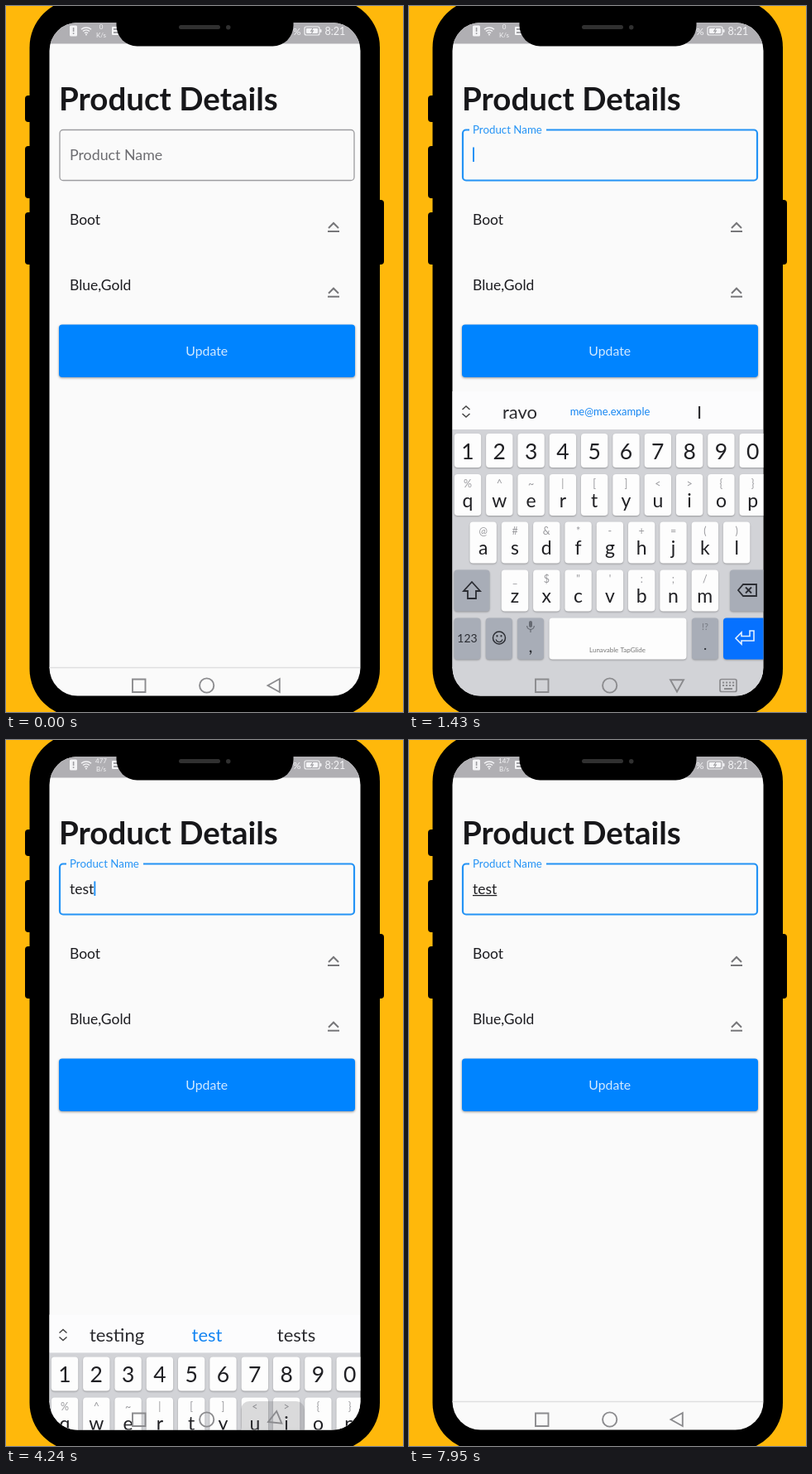
Animation, 480 px wide and 852 px high, one loop 8 s. Source, as an HTML page with a canvas:

```html
<!DOCTYPE html>
<html lang="en">
<head>
<meta charset="utf-8">
<title>Product form</title>
<style>
html, body { margin: 0; width: 100%; height: 100%; overflow: hidden; background: #ffb80b; }
canvas { display: block; }
</style>
</head>
<body>
<canvas id="stage" width="480" height="852"></canvas>
<script>
const ctx = document.getElementById('stage').getContext('2d');
const LOOP = 8000;
const INK = '#1c1c20', BLUE = '#2493f5', KEY_STEP = 38.3, KEYBOARD_HEIGHT = 368;

// Each entry holds from its time until the next one.
const typing = [[0, ''], [2100, 't'], [2480, 'te'], [2850, 'tes'], [3200, 'test']];
const hints = {
  '': ['ravo', 'me@me.example', 'I'],
  t: ['the', 't', 'to'],
  te: ['tell', 'te', 'tell me'],
  tes: ['test', 'tes', 'tests'],
  test: ['testing', 'test', 'tests']
};
const netSpeed = [[0, '0', 'K/s'], [2510, '477', 'B/s'], [5200, '35', 'B/s'], [7900, '147', 'B/s']];
const cursorResets = [600, 1300, 2100, 2480, 2850, 3200, 3780];

const lerp = (a, b, k) => a + (b - a) * k;
const latest = (list, t) => list.filter(item => item[0] <= t).pop();
function ramp(t, start, duration) {
  const u = Math.min(1, Math.max(0, (t - start) / duration));
  return u * u * (3 - 2 * u);
}

function text(str, x, y, size, color, align = 'left', weight = 400) {
  ctx.font = `${weight} ${size}px Lato, sans-serif`;
  ctx.textAlign = align;
  ctx.fillStyle = color;
  ctx.fillText(str, x, y);
}
const label = (str, x, y, size, color) => text(str, x, y, size, color, 'center');

function box(x, y, w, h, r, color) {
  ctx.beginPath();
  ctx.roundRect(x, y, w, h, r);
  ctx.fillStyle = color;
  ctx.fill();
}
function line(points, color, width = 2, closed = false) {
  ctx.beginPath();
  points.forEach(([x, y]) => ctx.lineTo(x, y));
  if (closed) ctx.closePath();
  stroke(color, width);
}
function stroke(color, width) {
  ctx.strokeStyle = color;
  ctx.lineWidth = width;
  ctx.stroke();
}
function arc(x, y, r, color, width, from = 0, to = Math.PI * 2) {
  ctx.beginPath();
  ctx.arc(x, y, r, from, to);
  stroke(color, width);
}
function shadowed(blur, color, draw) {
  ctx.save();
  ctx.shadowBlur = blur;
  ctx.shadowOffsetY = 1;
  ctx.shadowColor = color;
  draw();
  ctx.restore();
}

function statusBar(t) {
  const white = '#f4f4f6';
  box(52, 20, 376, 25.5, 0, '#b0afb3');
  box(77, 23.5, 9, 13, 1.5, white);
  box(80.8, 26, 1.6, 5, 0, '#a0a0a4');
  box(80.8, 32.3, 1.6, 1.7, 0, '#a0a0a4');
  for (const r of [3, 6, 9]) arc(97, 35, r, white, 1.4, -2.3, -0.84);
  box(96, 33.5, 2, 2, 1, white);
  const [, amount, unit] = latest(netSpeed, t);
  label(amount, 115, 28, 8, white);
  label(unit, 115, 37.5, 8, white);
  box(128, 25, 8, 10, 1, white);
  box(130, 27, 6, 2, 0, '#a0a0a4');
  box(130, 31, 6, 2, 0, '#a0a0a4');
  text('%', 347, 34.5, 12, white);
  ctx.beginPath();
  ctx.roundRect(361, 25, 18, 10, 2);
  stroke(white, 1.2);
  box(363, 27, 14, 6, 1, white);
  box(379.5, 28, 2, 4, 1, white);
  line([[371, 27], [368.5, 30.5], [371.5, 29.7], [369.5, 33]], '#8f8f93', 1);
  text('8:21', 385.5, 34.5, 12.5, white);
}

function nameField(t) {
  const focus = ramp(t, 400, 200);
  const color = focus > 0.4 ? BLUE : '#9c9c9f';
  ctx.beginPath();
  ctx.roundRect(65, 149.5, 356, 61, 4);
  stroke(color, lerp(1.3, 2.2, focus));
  if (focus > 0) box(lerp(119, 73, focus), 146, 93 * focus, 7, 0, '#fafafa');
  text('Product Name', 77, lerp(186, 154, focus), lerp(17.8, 13.3, focus), focus > 0.4 ? BLUE : '#6c6c70');
  if (focus < 1) return;

  const value = latest(typing, t)[1];
  text(value, 77, 185.5, 17.5, INK);
  const width = ctx.measureText(value).width;
  const composing = t < 4080 || t > 5200;
  if (composing) box(77, 187, width, 1.2, 0, INK);
  const sinceReset = t - cursorResets.filter(time => time <= t).pop();
  if (sinceReset % 1060 < 530) box(77 + width, 170.5, 2, 17.5, 0, BLUE);
}

function dropdown(value, y) {
  text(value, 77, y, 17.5, INK);
  line([[390, y + 4], [396, y - 2], [402, y + 4]], '#77777a');
  line([[389, y + 8], [403, y + 8]], '#77777a');
}

function page(t) {
  text('Product Details', 64, 126, 38.5, '#17171a', 'left', 700);
  nameField(t);
  dropdown('Boot', 264);
  dropdown('Blue,Gold', 342.7);
  shadowed(3, 'rgba(0,0,0,.4)', () => box(64, 384.5, 358, 63.5, 4, '#0084ff'));
  label('Update', 242.7, 422, 15.8, '#d2eaff');
  line([[52, 798.5], [428, 798.5]], '#dededf', 1.5);
}

function key(x, y, w, h, color = '#fdfdfd') {
  shadowed(2, 'rgba(0,0,0,.28)', () => box(x, y, w, h, 4, color));
}
function keyRow(chars, alternates, x, y, h) {
  [...chars].forEach((char, i) => {
    const center = x + i * KEY_STEP;
    key(center - 16.2, y, 32.4, h);
    if (alternates) {
      label(alternates[i], center, y + 15.5, 12.5, '#99999d');
      label(char, center, y + 39.5, 23, '#202024');
    } else {
      label(char, center, y + 31, 26.5, '#202024');
    }
  });
}

function keyboard(t, offset) {
  const gray = '#a8adb7', dark = '#2b2d33';
  ctx.save();
  ctx.translate(0, offset);
  box(52, 465, 376, 46, 0, '#fcfcfd');
  box(52, 511, 376, 330, 0, '#d2d3d7');
  line([[64.5, 487], [69, 483], [73.5, 487]], '#444', 1.5);
  line([[64.5, 492], [69, 496], [73.5, 492]], '#444', 1.5);
  const value = latest(typing, t)[1];
  const [left, middle, right] = hints[value];
  label(left, 134, 497.5, 22, '#2a2a2e');
  label(middle, 243, value ? 497.5 : 494, value ? 22 : 13, '#1485f2');
  label(right, 351, 497.5, 22, '#2a2a2e');

  keyRow('1234567890', null, 71, 516, 41);
  keyRow('qwertyuiop', '%^~|[]<>{}', 71, 565, 50);
  keyRow('asdfghjkl', '@#&*-+=()', 89.7, 622.5, 50);
  keyRow('zxcvbnm', '_$"\':;/', 128, 680.5, 50);

  key(54.5, 680.5, 43, 50, gray);
  line([[76, 695], [86, 706], [81, 706], [81, 715], [71, 715], [71, 706], [66, 706]], dark, 1.8, true);
  key(388, 680.5, 44, 50, gray);
  line([[398, 705], [404, 698], [420, 698], [420, 712], [404, 712]], dark, 1.8, true);
  line([[407, 701.5], [414, 708.5]], dark, 1.8);
  line([[414, 701.5], [407, 708.5]], dark, 1.8);

  for (const x of [54.5, 92.8, 131, 342]) key(x, 738.5, 32, 50, gray);
  label('123', 70.5, 768, 14, dark);
  arc(109, 762.5, 7.5, dark, 1.5);
  arc(109, 763.5, 4, dark, 1.3, 0.2, Math.PI - 0.2);
  box(105.5, 759, 2, 2.5, 1, dark);
  box(110.5, 759, 2, 2.5, 1, dark);
  box(145, 742, 4, 8, 2, '#666a72');
  arc(147, 748, 4.3, '#666a72', 1.2, 0, Math.PI);
  line([[147, 752], [147, 756]], '#666a72', 1.2);
  label(',', 147, 780, 22, dark);
  label('.', 358, 777, 18, dark);
  label('!?', 358, 753, 11, '#777b83');
  key(169.5, 738.5, 166, 50);
  label('Lunavable TapGlide', 252, 779.5, 8, '#777');
  key(380, 738.5, 52, 50, '#0671ff');
  line([[395, 763], [402, 756], [402, 760.5], [412, 760.5], [412, 754], [417, 754],
    [417, 766], [402, 766], [402, 770]], '#e4f1ff', 1.6, true);
  ctx.restore();
}

function navigation(t) {
  const color = '#8b8b8e';
  const pressed = ramp(t, 4000, 80) * (1 - ramp(t, 4150, 300));
  box(284, 798, 77, 40, 10, `rgba(90,90,95,${0.28 * pressed})`);
  ctx.beginPath();
  ctx.rect(153, 812.5, 15.5, 15.5);
  stroke(color, 1.9);
  arc(242.7, 820, 8.6, color, 1.9);

  const turn = ramp(t, 700, 180) - ramp(t, 4080, 240);
  ctx.save();
  ctx.translate(324, 820);
  ctx.rotate(-turn * Math.PI / 2);
  line([[-7.5, 0], [6.8, -8], [6.8, 8]], color, 1.9, true);
  ctx.restore();

  if (t < 800 || t > 4120) return;
  ctx.beginPath();
  ctx.roundRect(376, 812.5, 20, 15, 2);
  stroke(color, 1.7);
  for (let i = 0; i < 8; i++) box(379 + (i % 4) * 4, 815.5 + (i >> 2) * 3.5, 2.2, 2, 0, color);
  box(381, 823, 10, 2, 0, color);
}

function phone() {
  box(0, 0, 480, 852, 0, '#ffb80b');
  box(28.5, -8, 423.5, 866, 58, '#000');
  for (const [x, y, h] of [[23, 108, 32], [23, 169, 63], [23, 249, 63], [445, 234, 78]]) {
    box(x, y, 12, h, 4, '#000');
  }
}

function draw(t) {
  phone();
  ctx.save();
  ctx.beginPath();
  ctx.roundRect(52.5, 20, 376, 812.5, 34);
  ctx.clip();
  box(52, 20, 377, 813, 0, '#fafafa');
  statusBar(t);
  page(t);
  const shown = ramp(t, 1000, 300) - ramp(t, 4080, 277);
  if (shown > 0) keyboard(t, (1 - shown) * KEYBOARD_HEIGHT);
  navigation(t);
  ctx.restore();
  box(133.5, 0, 214, 48.5, [0, 0, 25, 25], '#000');
  box(209, 23, 50, 5, 2.5, '#303030');
  box(266, 23, 5.5, 5.5, 3, '#303030');
}

const start = performance.now();
function tick() {
  draw((performance.now() - start) % LOOP);
  requestAnimationFrame(tick);
}
tick();
</script>
</body>
</html>
```
